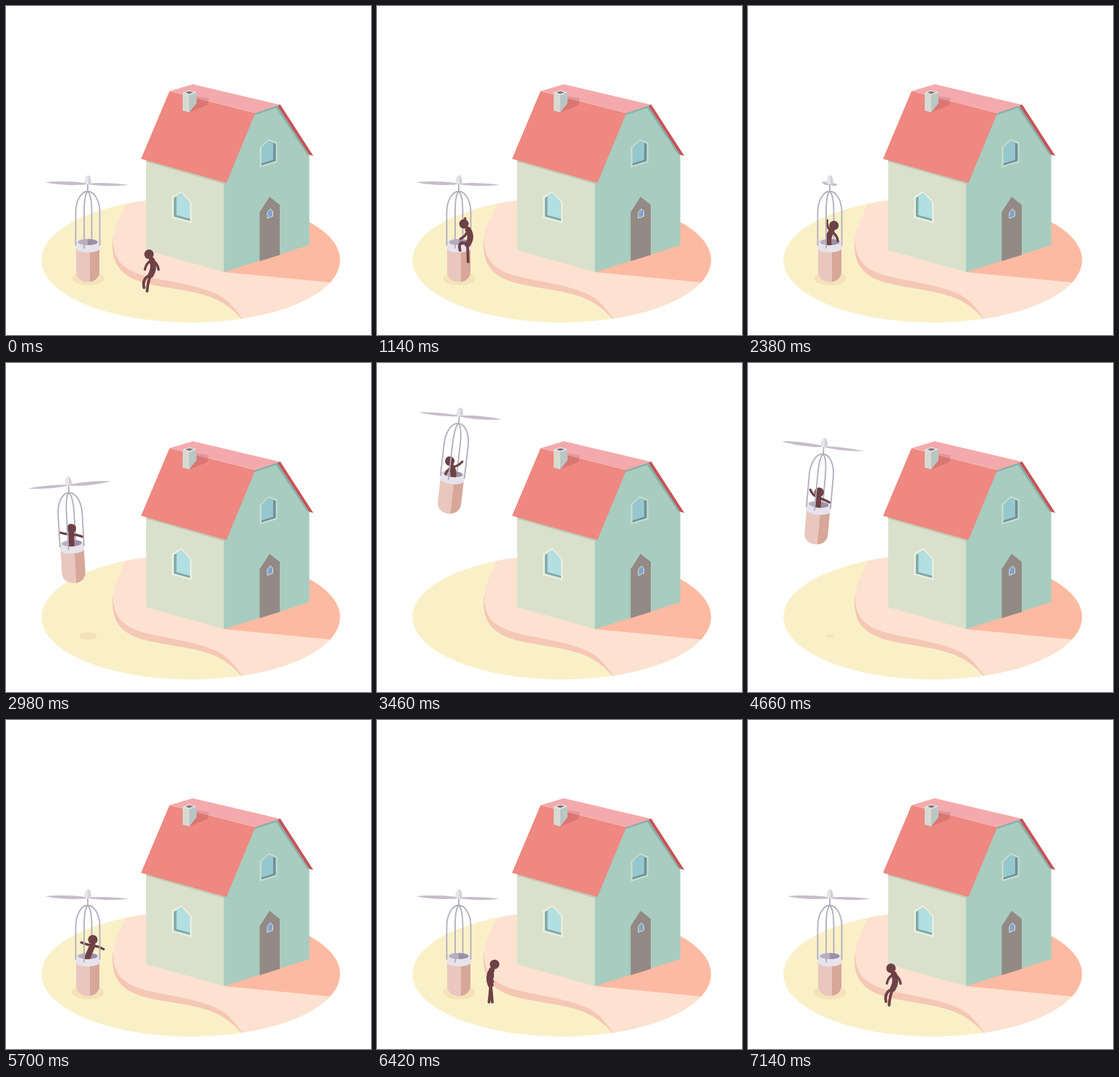
An HTML page for the animation above (8.24 s loop, 500 by 450 pixels).

```html
<!DOCTYPE html>
<html lang="en">
<head>
<meta charset="utf-8">
<title>Little flying basket</title>
<style>
  html, body { margin: 0; width: 100%; height: 100%; overflow: hidden; background: #fff; }
  svg { display: block; width: 100vw; height: 100vh; }
  .bars, .limbs { fill: none; stroke-linecap: round; stroke-linejoin: round; }
  .bars { stroke: #b3adbd; stroke-width: 1.8; }
  .limbs { stroke: #6d4145; stroke-width: 3.3; }
</style>
</head>
<body>
<svg viewBox="0 0 500 450">
  <defs>
    <clipPath id="island"><ellipse cx="253" cy="347.500" rx="204.500" ry="85.500"/></clipPath>
  </defs>

  <g clip-path="url(#island)">
    <rect y="250" width="500" height="200" fill="#faf0c8"/>
    <path fill="#f5c7b5" d="M146 318C144 350 154 368 187 378C215 386 248 387 280 398C298 405 312 415 323 429L340 400L200 320Z"/>
    <path fill="#fde1d1" d="M168 262C158 284 147 304 146.500 319C147 347 160 361 190 369C220 377 250 379 284 392C302 399 313 412 324 429L330 440H500V250H170Z"/>
    <path fill="#fdbaa2" d="M299 364L443 378L500 384V240H400Z"/>
  </g>
  <ellipse id="shade" cx="112.500" fill="#f5e2b8"/>

  <g id="house">
    <path fill="#d9e1cc" d="M192 208L299 240V364L192 334Z"/>
    <path fill="#c3cab4" d="M192 208L300 240V244L192 213Z"/>
    <path fill="#a8ccbf" d="M298.500 242L341 146L372 136L415.500 202V327L298.500 364Z"/>
    <path fill="#88b0a8" d="M341 146L372 136L416 203.500L412.500 203L370 139.500L339.500 149.500Z"/>
    <path fill="#ee8880" d="M224 116.500L341.500 146.500L302 242L185 209Z"/>
    <path fill="#f4aaac" d="M224 116.500L256 107L375 135L341.500 146.500Z"/>
    <path fill="#c95155" d="M372 136.500L375.500 134.500L421 205L415.500 203.500Z"/>

    <path fill="#da7672" d="M251 145.500L261 126L277 130L276 135.500Z"/>
    <path fill="#e2979a" d="M261 123.500L278 126L277 130.500L261 126.500Z"/>
    <path fill="#d6dad1" d="M242 118.500L251 121.500V145.500L242 143Z"/>
    <path fill="#b9c6c3" d="M251 121.500L261 118V133L251 145.500Z"/>
    <path fill="#e9ebe7" d="M242 118.500L251 115L261 118L251 122Z"/>
    <path fill="#8b7a86" d="M245.500 118.300L251 116.300L257 118L251 120.500Z"/>

    <path fill="#e9eedd" d="M227 260.500L240 253L254.500 268V297.500L227 290Z"/>
    <path fill="#7fa9a8" d="M230 262.500L240 256L252 269V294L230 288Z"/>
    <path fill="#b2dfe2" d="M233.500 260.300L240 256L252 269V291L233.500 286Z"/>

    <path fill="#c6dccd" d="M347.500 193.500L360 182L371.500 186.500V214L347.500 221Z"/>
    <path fill="#6d8f99" d="M350 194.500L360 184.800L369.500 188.500V212L350 218Z"/>
    <path fill="#95c8ce" d="M350 194.500L360 184.800L366 187.200V210.500L350 215.500Z"/>

    <path fill="#938985" d="M347.500 282L361 261L375 272V340.500L347.500 349Z"/>
    <path fill="#84a3c8" stroke="#d8e0e6" d="M358 282.500L362 277.500L365.500 280.500V287.500L358 290.500Z"/>
  </g>

  <g id="craft">
    <ellipse cx="112" cy="323.500" rx="16.300" ry="5.500" fill="#e6e3ec"/>
    <ellipse cx="112" cy="323" rx="13.500" ry="4.300" fill="#b8aebf"/>
    <path fill="#9c90a8" d="M112 318.700A13.500 4.300 0 0 1 112 327.300Z"/>
    <path class="bars" d="M112 253.500C115.500 257 117.500 268 117.500 283V318"/>
    <g id="cabin"></g>
    <path fill="#e9c7be" d="M96 330V363C96 372 103 377.500 112 377.500S128 372 128 363V330Z"/>
    <path fill="#d7a799" d="M115 330H128V363C128 371 122 376.500 115 377.300Z"/>
    <path fill="#e6e3ec" d="M95.700 323.500L98.500 323A13.500 4.300 0 0 0 125.500 323L128.300 323.500V331.500A16.300 5.500 0 0 1 95.700 331.500Z"/>
    <path class="bars" d="M95.500 327V283C95.500 266 103 253.500 112 253.500S128.500 266 128.500 283V327M112 242V253.500C108.500 257 107 268 107 283V331"/>
    <g id="blades" fill="#c6bdcb">
      <path d="M54 241.200C70 239.300 95 240 110 242.500V244C95 245.800 72 245 54 241.200Z"/>
      <path d="M114 242.700C130 241.300 150 242.500 168 244.500C150 246.800 130 246.300 114 244.200Z"/>
    </g>
    <path fill="#e7e5e9" d="M112 231.500C115 231.500 117 238 116.500 242Q112 246 107.500 242C107 238 109 231.500 112 231.500Z"/>
    <path fill="#d3d0d8" d="M112.500 231.500C115 231.500 117 238 116.500 242Q115 243.500 113 244Z"/>
  </g>

  <g id="outside">
    <g id="walker" class="limbs">
      <path id="legs" style="stroke-width:3.800"/>
      <path id="torso" style="stroke-width:8"/>
      <path id="arms"/>
      <circle id="head" r="6.500" fill="#6d4145" stroke="none"/>
    </g>
  </g>
</svg>

<script>
const LOOP = 8240, FIRST = 300, LAST = 7140, STEP = 40;
const TAKEOFF = 2400, TOP = 195, LANDED = 5180;
const $ = id => document.getElementById(id);
const set = (id, attrs) => Object.entries(attrs).forEach(([k, v]) => $(id).setAttribute(k, v));
const clamp = (v, lo = 0, hi = 1) => Math.min(hi, Math.max(lo, v));
const part = (t, from, to) => clamp((t - from) / (to - from));
const ease = u => u * u * (3 - 2 * u);
const mix = (a, b, u) => Array.isArray(a) ? a.map((v, i) => mix(v, b[i], u)) : a + (b - a) * u;

// Eased value between [time, value] keys; a value may itself move with time
function track(t, keys) {
  const at = key => typeof key[1] === "function" ? key[1](t) : key[1];
  const next = keys.findIndex(key => key[0] > t);
  if (next < 0) return at(keys[keys.length - 1]);
  if (next === 0) return at(keys[0]);
  const a = keys[next - 1], b = keys[next];
  return mix(at(a), at(b), ease(part(t, a[0], b[0])));
}

const sway = [[2480, 0], [3060, -28], [3630, 9], [4280, -13], [LANDED, 0]];
const tilt = [[2480, 0], [2780, -6], [3460, 6.6], [3900, -5], [4600, 5.2], [LANDED, 0]];
const heightAt = t => TOP * (ease(part(t, TAKEOFF, 3760)) - part(t, 4260, LANDED) ** 1.3);

// Steady spin in half turns, then a slow stop
function bladeWidth(t) {
  const brake = part(t, 4660, LANDED);
  const turns = clamp((t - 1780) / 240, 0, 12) + brake * (2.6 - 0.6 * brake);
  const c = Math.cos(Math.PI * turns);
  return (c < 0 ? -1 : 1) * Math.max(0.19, Math.abs(c));
}

// Pose: hip x, hip y, lean, facing (-1 left, 1 right), then angles from straight down
// of left arm, right arm and two legs
const stand = [198.5, 367.5, 4, -1, -37, 35, -13, -28];
const cling = [124, 326, 2, -1.4, -166, -40, 2, -51];
const mount = [118, 322, 3, -0.5, -150, 40, 5, -40];
const grip = [111, 328, 9, 0.9, -159, 34, 0, 0];
const point = [111, 334, -3, -1, -30, 125, 0, 0];
const wave = [111, 334, 0, 0, -130, 73, 0, 0];
const look = [111, 327, 22, 0.1, -105, 72, 0, 0];
const vault = [124, 318, 8, 0.5, -60, 60, 35, -10];

function stride(t, x, y, facing) {
  const s = Math.sin(t / 64);
  return [x, y, 4 * facing, facing, -30 * s, 30 * s, 25 * s, -25 * s];
}
const goLeft = t => {
  const u = part(t, FIRST, 860);
  return stride(t, mix(198, 138, u), mix(368, 353, u), -1);
};
const goRight = t => {
  const u = part(t, 6180, 7080);
  return stride(t, mix(141, 196, u), mix(360, 368, u), 1);
};

const script = [
  [FIRST, stand], [420, goLeft], [820, goLeft], [1130, cling], [1180, cling], [1400, mount],
  [1700, look], [2100, grip], [2740, grip], [3260, point], [3540, point], [4000, grip],
  [4420, wave], [4800, wave], [LANDED, grip], [5380, grip], [5660, look], [5720, look],
  [5900, vault], [6180, goRight], [7020, goRight], [LAST, stand]
];

const polar = degrees => {
  const a = degrees * Math.PI / 180;
  return [Math.sin(a), Math.cos(a)];
};

// Curved limb, bent sideways at its middle
function limb([x, y], angle, length, bend) {
  const [s, c] = polar(angle);
  const half = length / 2;
  return `M${x} ${y}q${half * s + bend * c} ${half * c - bend * s} ${length * s} ${length * c}`;
}
function arm(shoulder, angle, side) {
  return limb(shoulder, angle, 16, side * 5 * polar(angle)[1]);
}
function leg(hip, angle, facing) {
  const raised = polar(angle)[0] ** 2;
  return limb(hip, angle, 24 - 18 * raised, facing * Math.min(10, 40 * raised));
}

function drawWalker([x, y, lean, facing, armL, armR, legL, legR]) {
  const [s, c] = polar(lean);
  const hip = [x, y], shoulder = [x + 20 * s, y - 20 * c];
  set("head", { cx: shoulder[0] + 4 * facing, cy: shoulder[1] - 8 });
  set("torso", { d: limb(hip, 180 - lean, 20, 5 * facing) });
  set("arms", { d: arm(shoulder, armL, -1) + arm(shoulder, armR, 1) });
  set("legs", { d: leg(hip, legL, facing) + leg(hip, legR, facing) });
}

function render(now) {
  const time = now % LOOP;
  const t = time < FIRST ? 0 : Math.min(LAST, FIRST + STEP * Math.round((time - FIRST) / STEP));
  const height = heightAt(t);
  set("craft", { transform: `translate(${track(t, sway)} ${-height}) rotate(${track(t, tilt)} 112 242)` });
  set("blades", { transform: `translate(112 0) scale(${bladeWidth(t)} 1) translate(-112 0)` });

  const size = Math.max(0, 1 - height / 167);
  set("shade", { rx: 22 * size, ry: 9.5 * size, cy: 374 - 1.5 * size });

  const home = t > 1400 && t < 5800 ? $("cabin") : $("outside");
  if ($("walker").parentNode !== home) home.appendChild($("walker"));
  drawWalker(track(t, script));
}

function tick() {
  render(performance.now());
  requestAnimationFrame(tick);
}
tick();
</script>
</body>
</html>
```
